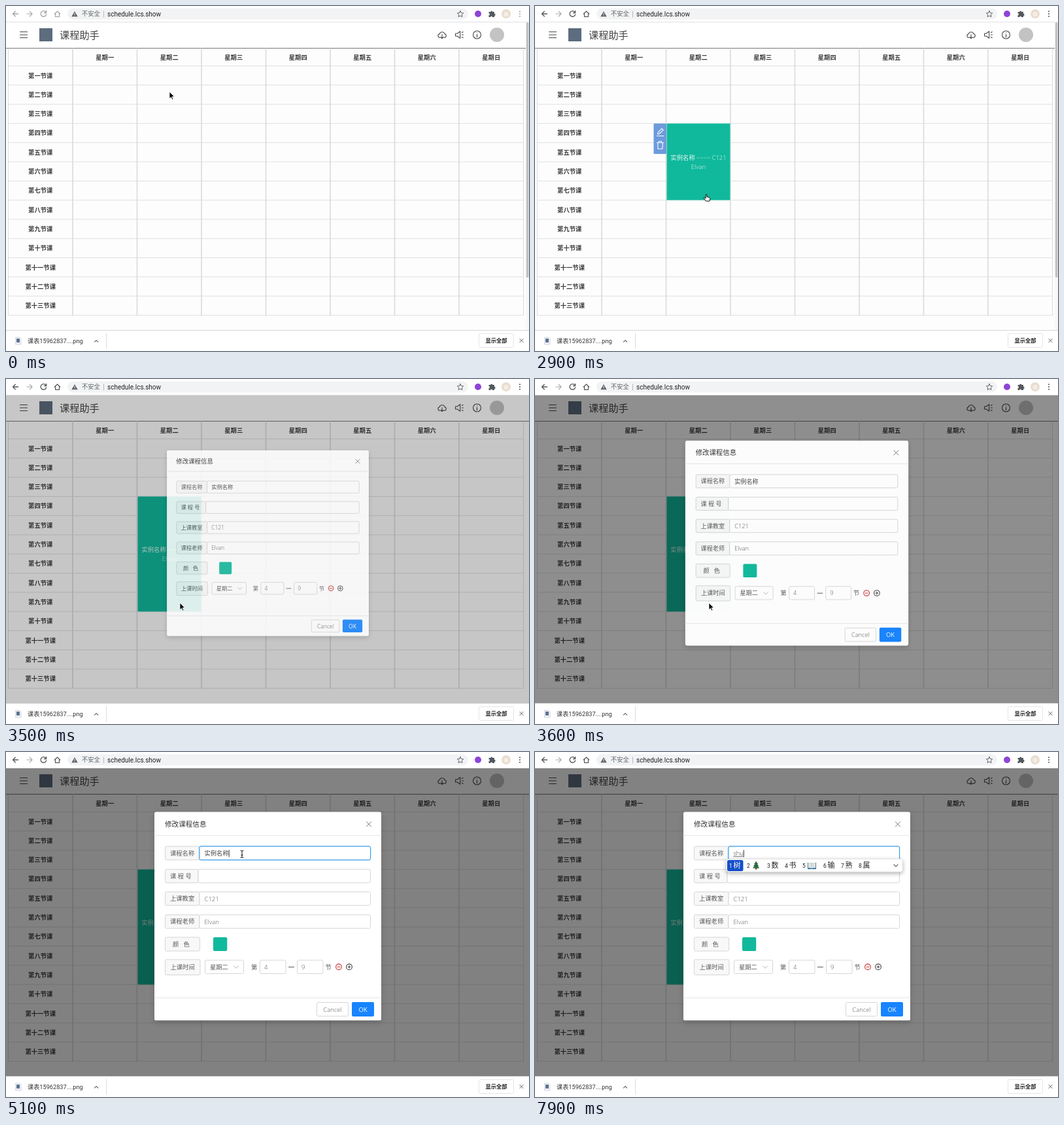
An HTML page for the animation above (8 s loop, 800 by 527 pixels).

```html
<!DOCTYPE html>
<html lang="zh-CN">
<head>
<meta charset="utf-8">
<title>课程表</title>
<style>
  html, body { margin: 0; width: 100%; height: 100%; overflow: hidden; background: #fff; }
  svg { display: block; width: 800px; height: 527px; }
  text { font-family: "Open Sans", "Noto Sans CJK SC", "Noto Sans CJK", sans-serif; white-space: pre; }
  .ui { font-family: Roboto, "Noto Sans CJK SC", "Noto Sans CJK", sans-serif; }
  .mid { text-anchor: middle; }
  .bold { font-weight: 600; }
  .light { font-weight: 300; }
  .line { fill: none; stroke-linecap: round; stroke-linejoin: round; }
</style>
</head>
<body>
<svg id="stage" viewBox="0 0 800 527" xmlns="http://www.w3.org/2000/svg"></svg>
<script>
const LOOP = 8000, STEP = 100;
const LEFT = 3.5, COL = 98.5, TOP = 91.5, ROW = 29.3;
const GREEN = '#11b99c', TEACHER = 'Elvan', COURSE = '实例名称';
const PRESS = 1900, RELEASE = 3400, ZOOM = 3416, FOCUS = 4850, ERASE = 5900, TYPE = 7300;
const FIRST_ROW = 4;
const FIELDS = [154.5, 189.5, 224, 259];

// Shape helpers; text is placed by its vertical centre.
const text = (x, y, s, size, fill, cls = '', more = '') =>
  `<text x="${x}" y="${y + size * .37}" font-size="${size}" fill="${fill}" class="${cls}" ${more}>${s}</text>`;
const rect = (x, y, w, h, fill, stroke = 'none', r = 0, more = '') =>
  `<rect x="${x}" y="${y}" width="${w}" height="${h}" rx="${r}" fill="${fill}" stroke="${stroke}" ${more}/>`;
const line = (d, stroke, width = 1, more = '') =>
  `<path class="line" d="${d}" stroke="${stroke}" stroke-width="${width}" ${more}/>`;
const dot = (x, y, r, fill, stroke = 'none', width = 1) =>
  `<circle cx="${x}" cy="${y}" r="${r}" fill="${fill}" stroke="${stroke}" stroke-width="${width}"/>`;
const cross = (x, y, r, color) =>
  line(`M${x - r} ${y - r}l${2 * r} ${2 * r}m0 ${-2 * r}l${-2 * r} ${2 * r}`, color);

function browserBar() {
  return rect(0, 0, 800, 24, '#fff') + rect(94, 3.5, 613, 17, '#f1f3f4', 'none', 8.5) +
    `<g id="nav">` +
    line('M18.5 12h-8m3.8-3.8L10.500 12l3.800 3.800', 'currentColor', 1.3) +
    line('M61 9.500a4.300 4.300 0 1 0 .6 3.500M61.600 7.500v3h-3', 'currentColor', 1.3) +
    line('M74.300 12l4.200-4 4.200 4M75.500 11.500v4.800h6v-4.800', 'currentColor', 1.2) +
    [8.300, 12, 15.700].map(y => dot(786, y, 1.05, 'currentColor')).join('') + `</g>` +
    line('M32 12h8m-3.800-3.800L40 12l-3.800 3.800', '#a5a8ab', 1.2) +
    `<path d="M105 8l4.700 8.200h-9.400z" fill="#5f6368"/>` +
    line('M105 11v2.200m0 1.500v.1', '#fff', .9) +
    text(116, 12, '不安全', 9.3, '#5f6368', 'ui') + line('M149.500 8v9', '#b5b8bb') +
    text(155, 12.2, 'schedule.lcs.show', 10, '#202124', 'ui') +
    line('M695 7.500l1.400 3 3.300.4-2.400 2.300.6 3.300-2.900-1.600-2.900 1.600.6-3.300-2.400-2.300 3.300-.4z', '#5f6368') +
    dot(722, 12, 5, '#8e44d6') +
    `<path d="M738.500 9h2.700a1.600 1.600 0 1 1 3.200 0h2.600v2.800a1.600 1.600 0 1 1 0 3.200v2h-3a1.500 1.500 0 0 0-3 0h-2.500v-3a1.500 1.500 0 0 0 0-3z" fill="#54585c"/>` +
    dot(765, 12, 7, '#e9ddd0') + dot(765, 12.5, 3.5, '#f5ede4') +
    line('M0 24.500h800', '#e1e2e4');
}

function pageHeader() {
  const ink = '#4a4a4a';
  return rect(0, 25, 800, 40, '#fff') +
    line('M21.500 39.500h11m-11 4.500h11m-11 4.500h11', ink, 1.1) +
    rect(51, 34, 20, 20, '#5d6c7e') +
    text(82, 44, '课程助手', 15.2, '#444', 'light') +
    line('M664 48.300h-.6a2.900 2.900 0 0 1-.2-5.700a4.100 4.100 0 0 1 7.800 0a2.900 2.900 0 0 1-.2 5.700h-.8M667 43.500v6m-2-2l2 2 2-2', ink, 1.1) +
    line('M687.500 42h2.800l4.400-3.300v10.600l-4.400-3.300h-2.800zM697.500 40.500l1.700-1m-1.700 4.500h2m-2 3.500l1.700 1', ink, 1.1) +
    dot(720.5, 44, 6, 'none', ink, 1.1) + line('M720.500 43.500v4m0-6.600v.1', ink, 1.2) +
    dot(751, 44, 11, '#c3c3c3') + line('M0 64.500h800', '#777');
}

function timetable() {
  const days = [...'一二三四五六日'], right = LEFT + COL * 8, bottom = TOP + ROW * 13;
  const rows = ['一', '二', '三', '四', '五', '六', '七', '八', '九', '十', '十一', '十二', '十三'];
  let out = '';
  for (let r = 0; r <= 13; r++) out += line(`M${LEFT} ${TOP + ROW * r}H${right}`, '#dfe0e2');
  for (let c = 0; c <= 8; c++)
    out += line(`M${LEFT + COL * c} 65V${bottom}`, '#dadcdf', c % 8 ? 1.7 : 1);
  days.forEach((d, i) => out += text(LEFT + COL * (i + 1.5), 78.3, '星期' + d, 9.3, '#3d3d3d', 'mid bold'));
  rows.forEach((n, i) => out += text(52.7, TOP + ROW * (i + .5), `第${n}节课`, 9.3, '#3d3d3d', 'mid bold'));
  return out;
}

function card() {
  return `<g id="card">` + rect(201.5, 179.4, 97, 0, GREEN, '#7fd8c8', 1, 'id="block" stroke-width=".8" stroke-dasharray="1.500 1"') +
    `<g id="label">` + text(250, -6.5, `${COURSE} ~~~~ C121`, 9.3, '#e4f7f3', 'mid light') +
    text(250, 7, TEACHER, 9.5, '#e4f7f3', 'mid light') + `</g>` +
    `<g id="tools">` + rect(181.5, 179.4, 19.500, 46.600, '#6d9bdc', 'none', 1.5) +
    line('M187.500 195.800l.8-3 5.700-5.700 2.200 2.200-5.700 5.700zM186.500 198.500h10.500', '#fff', 1.1) +
    line('M186.500 208.800h10M189.500 208.500v-1.700h4v1.700M187.700 209l.4 9.300h6.800l.4-9.300', '#fff', 1.1) + `</g></g>`;
}

function downloads() {
  return rect(0, 495, 800, 32, '#fff') + line('M0 495.500h800', '#d4d5d7') +
    `<path d="M14.500 506h6l2.500 2.500v8.500h-8.500z" fill="#eef1f5" stroke="#c6cbd2" stroke-width=".7"/>` +
    rect(16, 508, 5, 6, '#5c7391', 'none', 1) +
    text(33, 512, '课表15962837....png', 9.2, '#333', 'ui') +
    line('M135.500 513.200l2.600-2.600 2.600 2.600', '#5f6368', 1.2) + line('M153.500 500v23', '#dadce0') +
    rect(723.5, 500.5, 53, 21, '#fff', '#e3e5e8', 2) +
    text(750, 511, '显示全部', 8.3, '#222', 'mid bold') + cross(788.5, 511, 2.6, '#5f6368');
}

function imeBar() {
  const words = ['树', '', '数', '书', '', '输', '熟', '属'];
  const at = [297, 324, 355, 382, 409, 441, 468, 495];
  let out = rect(293, 163.5, 269, 19.5, '#fff', '#d8d8d8', 3, 'stroke-width=".6" filter="url(#soft)"') +
    rect(294, 165, 24.5, 17, '#1650c9', 'none', 2.5);
  words.forEach((w, i) => {
    const ink = i ? '#222' : '#fff';
    out += text(at[i], 173.7, i + 1, 8.5, ink, 'ui') + text(at[i] + 6.5, 173.2, w, 11, ink);
  });
  return `<g id="ime">` + out +
    rect(337, 176, 2.4, 3.5, '#795038') +
    `<path d="M338.200 167l3 4h-1.300l2.500 3.200h-1.500l2.400 3.300h-10.200l2.400-3.300h-1.500l2.500-3.200h-1.300z" fill="#2c6d3f"/>` +
    `<path d="M417 169h13v10h-13z" fill="#3f7fa8"/>` +
    `<path d="M418 168q3-1 5.500 1q2.500-2 5.500-1v9q-3-1-5.500 1q-2.500-2-5.500-1z" fill="#f6f4ec"/>` +
    line('M423.500 169v8.500M419.500 170.500h2.500m-2.500 2.300h2.500m-2.500 2.300h2.500m3-4.600h2.500m-2.500 2.300h2.500m-2.500 2.300h2.500', '#8a9ba5', .6) +
    line('M549 172l3 3 3-3', '#666', 1.1) + `</g>`;
}

function dialog() {
  const ink = '#595959', edge = '#d2d2d2', soft = '#f8f8f8';
  const t = (x, y, s, size = 9.3, fill = ink) => text(x, y, s, size, fill, 'light');
  const box = (x, y, w, h, fill = '#fff') => rect(x, y, w, h, fill, edge, 2, 'stroke-width=".9"');
  const names = ['课程名称', '课 程 号', '上课教室', '课程老师'], values = ['', '', 'C121', TEACHER];
  let out = rect(227, 91.5, 347, 318.5, '#fff', 'none', 2.5, 'filter="url(#shadow)"') +
    text(243, 110, '修改课程信息', 10.6, '#333') + cross(555, 110.3, 3.6, '#777') +
    line('M227 127.500h347M227 375.500h347', '#e6e6e6');
  FIELDS.forEach((y, i) => {
    const x = i === 1 ? 294 : 296;
    out += box(243.5, y - 10.3, x - 243.5, 20.6, soft) + box(x, y - 10.3, 557.5 - x, 20.6) +
      t(251, y, names[i]) + t(303.5, y, values[i], 9.5);
  });
  out += rect(296, 144.2, 261.5, 20.6, '#fff', '#2f97e8', 2, 'id="focus" filter="url(#glow)"') +
    `<text id="value" x="303.5" y="158" font-size="9.3" class="light" fill="#444"></text>` +
    line('M0 150v10', '#222', .9, 'id="caret"') +
    line('M303.500 159.700h0', '#555', .8, 'id="under"') +
    box(243.5, 283, 53, 21, soft) + t(255, 293.3, '颜') + t(271.5, 293.3, '色') +
    rect(317, 283, 21.3, 21, GREEN, 'none', 2) +
    box(243.5, 317, 53.5, 23.5, soft) + t(251.5, 328.2, '上课时间') +
    box(304.5, 318, 59, 20.5) + t(312, 328.3, '星期二') + line('M349 327l3.300 3.300 3.300-3.300', '#aaa', .9) +
    t(375, 328.3, '第') + box(388.5, 318, 39.5, 20.5) + t(395, 328.3, '4', 9.5) +
    line('M432.500 328.500h8', ink) + box(445.5, 318, 39.5, 20.5) + t(452, 328.3, '9', 9.5) + t(488.5, 328.3, '节') +
    dot(509, 328.3, 4.4, '#fff', '#c9302c', 1.1) + line('M507 328.300h4', '#c9302c', 1.1) +
    dot(525, 328.3, 4.4, '#fff', '#444', 1.1) + line('M523 328.300h4m-2-2v4', '#444', 1.1) +
    box(475.5, 382.5, 48, 21) + text(499.5, 393.2, 'Cancel', 9.5, ink, 'mid light') +
    rect(529, 382, 34, 22, '#1884ff', 'none', 2) + text(546, 393.2, 'OK', 9.5, '#fff', 'mid');
  return `<g id="dialog">${out}${imeBar()}</g>`;
}

function pointers() {
  const outline = 'stroke="#fff" stroke-width=".8" stroke-linejoin="round"';
  return `<path id="arrow" d="M0 0v10.500l2.500-2.200 1.600 3.700 1.700-.8-1.600-3.600h3.400z" fill="#000" ${outline}/>` +
    `<path id="hand" d="M-.9 1q.9-1.600 1.800 0v3.500l4 1q1.200.6.900 2.200l-.8 3.300h-5.500l-3.300-4.300q-.3-1.300 1.200-.9l1.700 1.300z" fill="#fff" stroke="#111" stroke-width="1" stroke-linejoin="round"/>` +
    `<g id="beam">` + line('M-2-5.500q2 0 2 1.200q0-1.200 2-1.200M0-4.500v9M-2 5.500q2 0 2-1.200q0 1.200 2 1.200M-1 1.500h2', '#fff', 2) +
    line('M-2-5.500q2 0 2 1.200q0-1.200 2-1.200M0-4.500v9M-2 5.500q2 0 2-1.200q0 1.200 2 1.200M-1 1.500h2', '#111', 1) + `</g>`;
}

document.getElementById('stage').innerHTML =
  `<defs>
    <filter id="shadow" x="-10%" y="-10%" width="120%" height="125%"><feDropShadow dx="0" dy="3" stdDeviation="4" flood-opacity=".18"/></filter>
    <filter id="soft" x="-5%" y="-40%" width="110%" height="220%"><feDropShadow dx="0" dy="2" stdDeviation="3" flood-opacity=".35"/></filter>
    <filter id="glow" x="-5%" y="-30%" width="110%" height="160%"><feDropShadow dx="0" dy="0" stdDeviation="1" flood-color="#1890ff" flood-opacity=".35"/></filter>
  </defs>` +
  rect(0, 0, 800, 527, '#fdfdfd') + pageHeader() + timetable() + card() +
  `<g id="scroll">` + rect(795, 25, 5, 470, '#f8f8f8') + rect(795.8, 25, 3.6, 390, '#c1c1c1', 'none', 1.8) + `</g>` +
  rect(0, 25, 800, 470, '#000', 'none', 0, 'id="mask"') +
  browserBar() + downloads() + dialog() + pointers();

const el = id => document.getElementById(id);
const show = (id, on) => el(id).style.display = on ? '' : 'none';
const clamp = v => Math.min(1, Math.max(0, v));

// time, x, y, eased
const PATH = [
  [0, 250, 131], [1300, 259, 199, 1], [PRESS, 259, 199], [2900, 262, 287],
  [3300, 266, 342], [3750, 266, 342], [4700, 361, 156, 1], [LOOP, 361, 156],
];

function pointerAt(t) {
  const i = PATH.findIndex(p => p[0] > t);
  const [t0, x0, y0] = PATH[i - 1], [t1, x1, y1, eased] = PATH[i];
  let k = (t - t0) / (t1 - t0);
  if (eased) k = k * k * (3 - 2 * k);
  return [x0 + (x1 - x0) * k, y0 + (y1 - y0) * k];
}

// cubic-bezier(.08, .82, .17, 1)
function zoomEase(x) {
  const curve = (s, a, b) => 3 * (1 - s) ** 2 * s * a + 3 * (1 - s) * s * s * b + s ** 3;
  let lo = 0, hi = 1;
  for (let i = 0; i < 24; i++) {
    const s = (lo + hi) / 2;
    if (curve(s, .08, .17) < x) lo = s; else hi = s;
  }
  return curve(lo, .82, 1);
}

function drawCard(t, y) {
  const last = Math.max(FIRST_ROW, Math.ceil((y - TOP) / ROW));
  const rows = (t < RELEASE ? last : 9) - FIRST_ROW + 1;
  const top = TOP + ROW * (FIRST_ROW - 1);
  show('card', t >= PRESS);
  show('tools', t < RELEASE);
  el('block').setAttribute('height', rows * ROW);
  el('label').setAttribute('transform', `translate(0 ${top + rows * ROW / 2})`);
}

function drawDialog(t) {
  const k = zoomEase(clamp((t - ZOOM) / 300)), scale = .2 + .8 * k;
  show('dialog', t > ZOOM);
  show('scroll', t < RELEASE);
  el('mask').setAttribute('opacity', Math.min(.49, Math.max(0, (t - RELEASE) * .0022)));
  el('dialog').setAttribute('opacity', k);
  el('dialog').setAttribute('transform', `translate(400.5 250.8) scale(${scale}) translate(-400.5 -250.8)`);
}

function drawInput(t) {
  const typing = t >= TYPE, focused = t >= FOCUS;
  const erased = t < ERASE ? 0 : Math.floor((t - ERASE) / 150) + 1;
  const typed = Math.floor((t - TYPE) / 200) + 1;
  const value = el('value');
  value.textContent = typing ? 'shu'.slice(0, typed) : COURSE.slice(0, Math.max(0, COURSE.length - erased));
  const end = 304 + (value.textContent ? value.getComputedTextLength() : 0);
  show('focus', focused);
  show('caret', focused && (typing || (t - FOCUS) % 1000 < 500));
  el('caret').setAttribute('transform', `translate(${end} 0)`);
  show('under', typing);
  el('under').setAttribute('d', `M303.500 159.700H${end - .5}`);
  show('ime', typing);
}

function drawPointer(t, x, y) {
  const overField = t > 3700 && x > 296 && FIELDS.some(f => Math.abs(y - f) < 10);
  const shape = overField ? 'beam' : t >= PRESS && t < RELEASE ? 'hand' : 'arrow';
  for (const id of ['arrow', 'hand', 'beam']) show(id, id === shape && t < ERASE);
  el(shape).setAttribute('transform', `translate(${x} ${y})`);
}

function frame() {
  const t = Math.floor(performance.now() % LOOP / STEP) * STEP;
  const [x, y] = pointerAt(t);
  el('nav').style.color = t < 300 ? '#a3a5a8' : '#54585c';
  drawCard(t, y);
  drawDialog(t);
  drawInput(t);
  drawPointer(t, x, y);
  requestAnimationFrame(frame);
}
frame();
</script>
</body>
</html>
```
